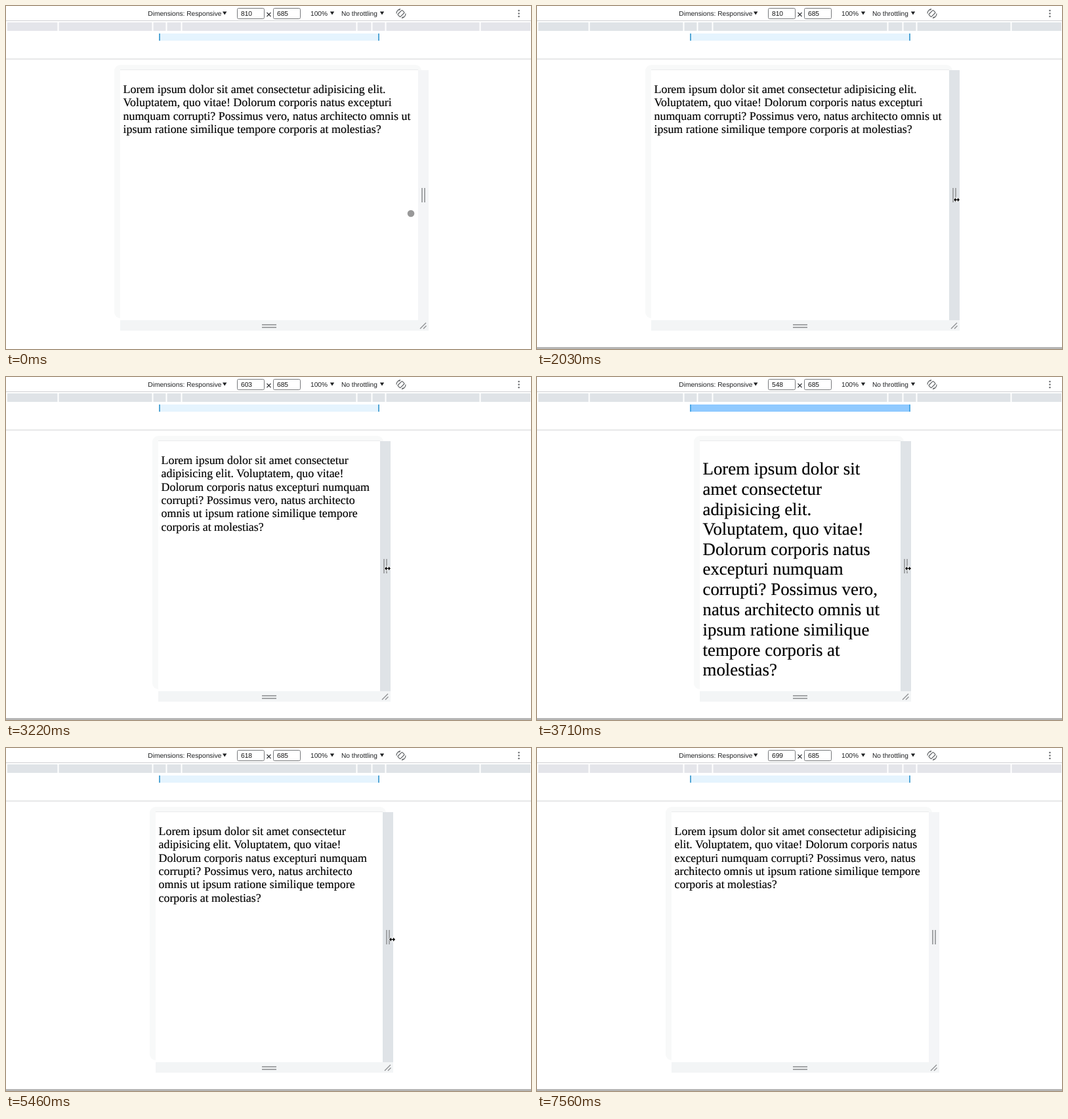
An HTML page that plays this animation: 800x524 px, repeating every 8400 ms.

```html
<!DOCTYPE html>
<html lang="en">
<head>
<meta charset="utf-8">
<title>Responsive text</title>
<style>
html, body { margin: 0; width: 100%; height: 100%; overflow: hidden; background: #fff; }
#stage { position: relative; width: 800px; height: 524px; overflow: hidden; --ruler: #e4e5ea; }
#stage.hover { --ruler: #dfe3e7; }
#stage > *, #device > * { position: absolute; }
#chrome { left: 0; top: 0; font: 10.2px "Liberation Sans", Arial, sans-serif; fill: #1f2123; text-rendering: geometricPrecision; }
#ruler { fill: var(--ruler); }
#query { left: 233px; top: 42px; width: 336px; height: 10.5px; box-sizing: border-box;
  background: #e5f4fe; border: solid #55a7d6; border-width: 0 2px; }
#query.on { background: #90caff; border-color: #4fa9e6; }
#device { top: 98px; height: 382px; }
.halo { left: -9px; top: -8px; right: -5px; bottom: 3px; border-radius: 9px; background: #f8f9f9; }
.page { inset: 0; background: #fff; box-shadow: 0 -1px #eaebec; }
/* Laid out in device pixels, then scaled to the stage. */
#text { left: 0; top: 0; box-sizing: border-box; margin: 0; padding: calc(1em + 1px) 8px 0;
  font: 32px/1.143 "Liberation Serif", Times, serif; color: #000; -webkit-text-stroke: .3px #000;
  text-rendering: geometricPrecision; transform-origin: 0 0; }
#text.big { font-size: 48px; }
.side { left: 100%; top: 0; width: 16px; height: 100%; background: #f4f5f7; }
.hover .side { background: #dfe3e7; }
.foot { left: 0; right: -16px; top: 100%; height: 16px; background: #f3f5f6; }
.grip { box-sizing: border-box; border: solid #a3a5a7; }
.side .grip { position: absolute; left: 5px; top: 180px; width: 6px; height: 22px; border-width: 0 2px; }
#footgrip { left: 390px; top: 486px; width: 22px; height: 6px; border-width: 2px 0; }
.corner { left: 100%; top: 100%; stroke: #8f9193; stroke-width: 1.4; }
#base { left: 0; top: 521px; width: 800px; height: 3px; background: #b5b5b5; }
#cursor { left: 0; top: 0; overflow: visible; }
</style>
</head>
<body>
<div id="stage">
  <svg id="chrome" width="800" height="84">
    <path d="M0 22.5H800M0 81H800" stroke="#cfd0d2"/>
    <text x="216.3" y="15.2">Dimensions: Responsive</text>
    <text x="464" y="15.2">100%</text>
    <text x="511" y="15.2">No throttling</text>
    <path d="M330 8.5h6.4l-3.2 5zM493.8 8.5h6.4l-3.2 5zM569.8 8.5h6.4l-3.2 5z"/>
    <g fill="#fff" stroke="#77797b">
      <rect x="352.5" y="3.5" width="41" height="16" rx="2"/>
      <rect x="407.5" y="3.5" width="41" height="16" rx="2"/>
    </g>
    <g fill="#111"><text id="width" x="358" y="15.2">810</text><text x="413" y="15.2">685</text></g>
    <path d="M397.5 10l6 6m0-6l-6 6" stroke="#303236" stroke-width="1.1"/>
    <g fill="none" stroke="#606366" stroke-width="1.2" transform="translate(602 11.5)">
      <rect x="-2.7" y="-4.8" width="5.4" height="9.6" rx="1" transform="rotate(45)"/>
      <path d="M-1-7A7 7 0 0 0-7 0M1 7A7 7 0 0 0 7 0M-1-7l-2.5 2M1 7l2.5-2"/>
    </g>
    <path d="M781.5 7v0m0 4.5v0m0 4.5v0" stroke="#6c6f72" stroke-width="2.6" stroke-linecap="round"/>
    <rect id="ruler" x="2" y="25" width="797" height="13"/>
    <path id="ticks" stroke="#fff" stroke-width="2"/>
  </svg>
  <div id="query"></div>
  <div id="device">
    <div class="halo"></div>
    <div class="page"></div>
    <p id="text">Lorem ipsum dolor sit amet consectetur adipisicing elit. Voluptatem, quo vitae! Dolorum corporis natus excepturi numquam corrupti? Possimus vero, natus architecto omnis ut ipsum ratione similique tempore corporis at molestias?</p>
    <div class="side"><div class="grip"></div></div>
    <div class="foot"></div>
    <svg class="corner" width="16" height="16"><path d="M3 13L12 4M8 13L12.5 8.5"/></svg>
  </div>
  <div id="footgrip" class="grip"></div>
  <div id="base"></div>
  <svg id="cursor" width="1" height="1">
    <circle id="touch" r="5.3" fill="#999"/>
    <path id="resize" d="M-4.5 0l3-3v2.2h3V-3l3 3-3 3V.8h-3V3z" stroke="#fff" stroke-width="1.2" paint-order="stroke"/>
  </svg>
</div>
<script>
const LOOP = 8400, STEP = 70, SCALE = 0.56, CENTER = 401, BAR = 16;
const $ = id => document.getElementById(id);

// Eased progress from 0 to 1 between two times; a power above 1 slows the end.
function ramp(t, from, to, power = 1) {
  const p = Math.min(1, Math.max(0, (t - from) / (to - from)));
  return 1 - (1 - p) ** power;
}

// Drag in past the breakpoint, nudge back, then drag out again.
const widthAt = t => Math.round(810
  - 262 * ramp(t, 2030, 3710, 1.267)
  + 29 * ramp(t, 4130, 4690)
  + 122 * ramp(t, 5040, 6380, 1.09));

// The pointer reaches the bar, rides along with it and leaves downwards.
function pointerAt(t, right) {
  const reach = ramp(t, 840, 1470), leave = ramp(t, 6860, 7490);
  const grip = right + 11.5 + 3 * ramp(t, 3710, 4130) + 16 * leave;
  const drift = ramp(t, 70, 630);
  const x = 617 - 5 * drift, y = 317 - 7 * drift;
  return {
    x: x + (grip - x) * reach,
    y: y + (296 - y) * reach - 3.5 * ramp(t, 2030, 3220) + 220 * leave
  };
}

$('ticks').setAttribute('d', [133.5, 156.5, 177.5, 321.5]
  .map(d => `M${CENTER - d} 25v13M${CENTER + d} 25v13`).join(''));
$('text').style.transform = `scale(${SCALE})`;

const show = (id, on) => { $(id).style.display = on ? '' : 'none'; };

function draw(t) {
  const width = widthAt(t), narrow = width <= 600;
  const left = Math.round(CENTER - width * SCALE / 2);
  const right = Math.round(CENTER + width * SCALE / 2);
  const { x, y } = pointerAt(t, right);
  const inside = t < 7560;
  const hover = inside && x >= right && x <= right + BAR && y < 480;

  $('device').style.left = left + 'px';
  $('device').style.width = right - left + 'px';
  $('width').textContent = width;
  $('text').style.width = width + 'px';
  $('text').classList.toggle('big', narrow);
  $('query').classList.toggle('on', narrow);
  $('stage').classList.toggle('hover', hover);
  $('cursor').style.transform = `translate(${x}px, ${y}px)`;
  show('base', t >= STEP);
  show('cursor', inside);
  show('touch', !hover);
  show('resize', hover);
}

const start = performance.now();
function tick() {
  const t = (performance.now() - start) % LOOP;
  draw(Math.floor(t / STEP) * STEP);
  requestAnimationFrame(tick);
}
tick();
</script>
</body>
</html>
```
